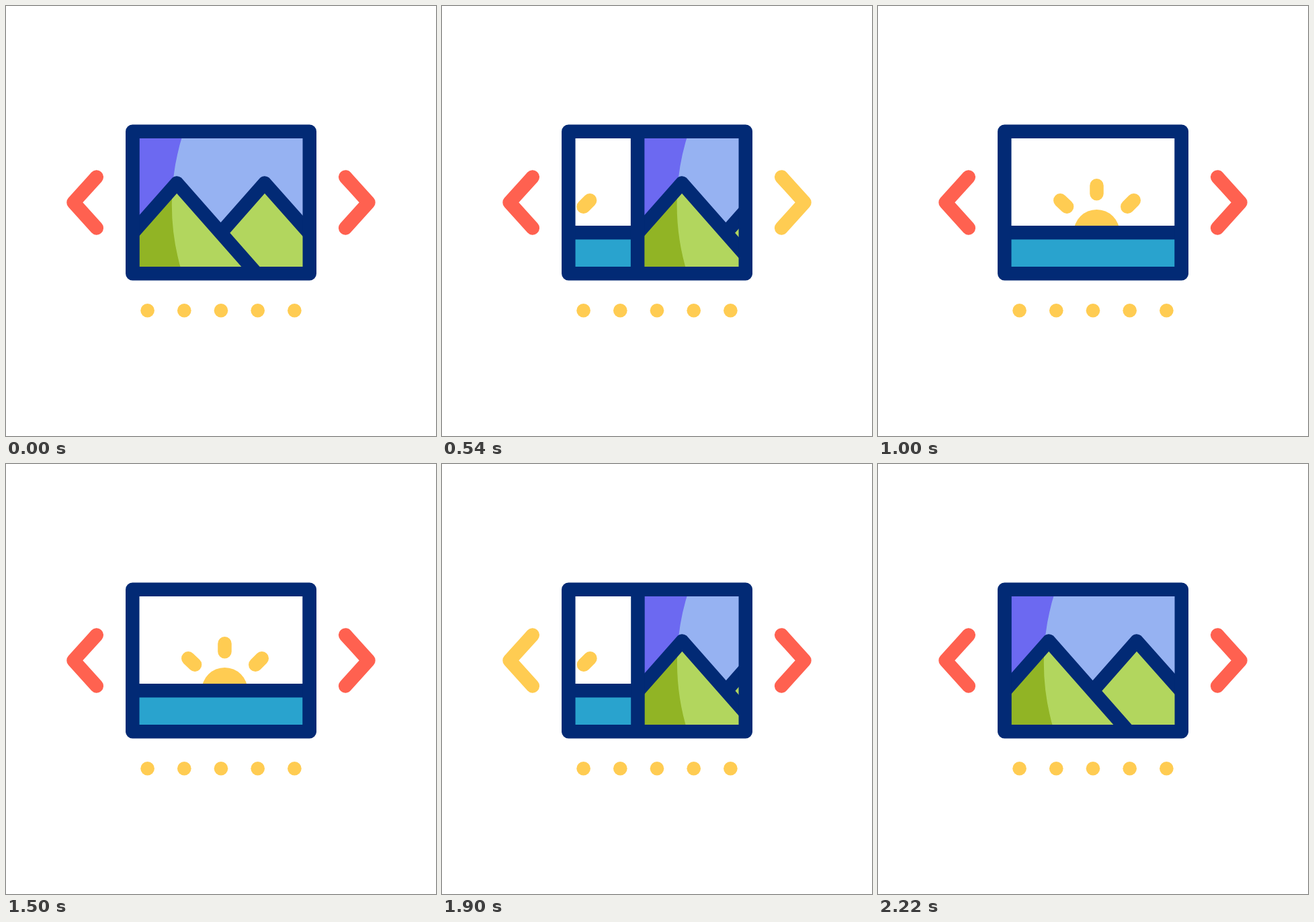
An HTML page for the animation above (2.4 s loop, 640 by 640 pixels).

```html
<!DOCTYPE html>
<html lang="en">
<head>
<meta charset="utf-8">
<title>Image slider</title>
<style>
  html, body { margin: 0; width: 100%; height: 100%; overflow: hidden; background: #fff; }
  svg { display: block; width: 100vw; height: 100vh; }
  .line { fill: none; stroke: #022a75; stroke-width: 20.5; stroke-linecap: round; stroke-linejoin: round; }
  .arrow { fill: none; stroke: #ff6150; stroke-width: 20.5; stroke-linecap: round; stroke-linejoin: round; }
  .ray { fill: none; stroke: #ffcc52; stroke-width: 20.5; stroke-linecap: round; }
  .sun { fill: #ffcc52; }
</style>
</head>
<body>
<svg viewBox="0 0 640 640">
  <defs>
    <clipPath id="view"><rect x="188.3" y="186.8" width="263.5" height="211.4"/></clipPath>
    <clipPath id="shade"><path d="M180 180H266.9A344 344 0 0 0 264.6 405H180Z"/></clipPath>
  </defs>

  <g clip-path="url(#view)">
    <g id="sea">
      <circle class="sun" cx="325.5" cy="337.3" r="34.3"/>
      <path class="ray" d="M325.5 267.2V279.2M271.3 289.3L281.1 298.7M380.8 289.3L371.3 298.8"/>
      <rect x="188.3" y="337.2" width="263.5" height="61" fill="#29a3ce"/>
      <path class="line" d="M188.3 337.2H451.8"/>
    </g>
    <g id="hills">
      <rect x="188.3" y="186.8" width="263.5" height="211.4" fill="#96b2f2"/>
      <rect x="188.3" y="186.8" width="100" height="211.4" fill="#6c69f1" clip-path="url(#shade)"/>
      <path fill="#b2d65e" d="M188.3 338.2L254.3 263.5L319.7 337.6L385 263.5L451.8 338.6V398.2H188.3Z"/>
      <path fill="#91b425" clip-path="url(#shade)" d="M188.3 338.2L254.3 263.5L373 398.2H188.3Z"/>
      <path class="line" d="M188.3 338.2L254.3 263.5L373 398.2M319.7 337.6L385 263.5L451.8 338.6"/>
      <path class="line" d="M188.3 186.8V398.2"/>
    </g>
  </g>

  <rect class="line" x="188.3" y="186.8" width="263.5" height="211.4"/>
  <path id="prev" class="arrow" d="M134.8 254.5L100.5 292.4L134.8 330.4"/>
  <path id="next" class="arrow" d="M505.2 254.5L539.5 292.4L505.2 330.4"/>
  <g id="dots" fill="#ffcc52"></g>
</svg>
<script>
  const LOOP = 2400, WIDTH = 263.5;
  const FORWARD = [200, 1000], BACK = [1500, 2200], FADE = 100;
  const RED = [255, 97, 80], YELLOW = [255, 204, 82];
  const el = id => document.getElementById(id);

  el('dots').innerHTML = [0, 1, 2, 3, 4]
    .map(i => `<circle cx="${210.6 + i * 54.7}" cy="453.3" r="10.3"/>`).join('');

  const ramp = (t, from, to) => Math.min(1, Math.max(0, (t - from) / (to - from)));
  const ease = x => x * x * (3 - 2 * x);
  const slide = (t, [from, to]) => ease(ramp(t, from, to));
  const glow = (t, [from, to]) => ramp(t, from, from + FADE) - ramp(t, to - FADE, to);

  function tint(id, amount) {
    const rgb = RED.map((c, i) => Math.round(c + (YELLOW[i] - c) * amount));
    el(id).style.stroke = `rgb(${rgb})`;
  }

  function draw(now) {
    const t = now % LOOP;
    const x = WIDTH * (slide(t, FORWARD) - slide(t, BACK));
    el('hills').setAttribute('transform', `translate(${x} 0)`);
    el('sea').setAttribute('transform', `translate(${x - WIDTH} 0)`);
    tint('next', glow(t, FORWARD));
    tint('prev', glow(t, BACK));
  }

  const start = performance.now();
  function tick() {
    draw(performance.now() - start);
    requestAnimationFrame(tick);
  }
  tick();
</script>
</body>
</html>
```
